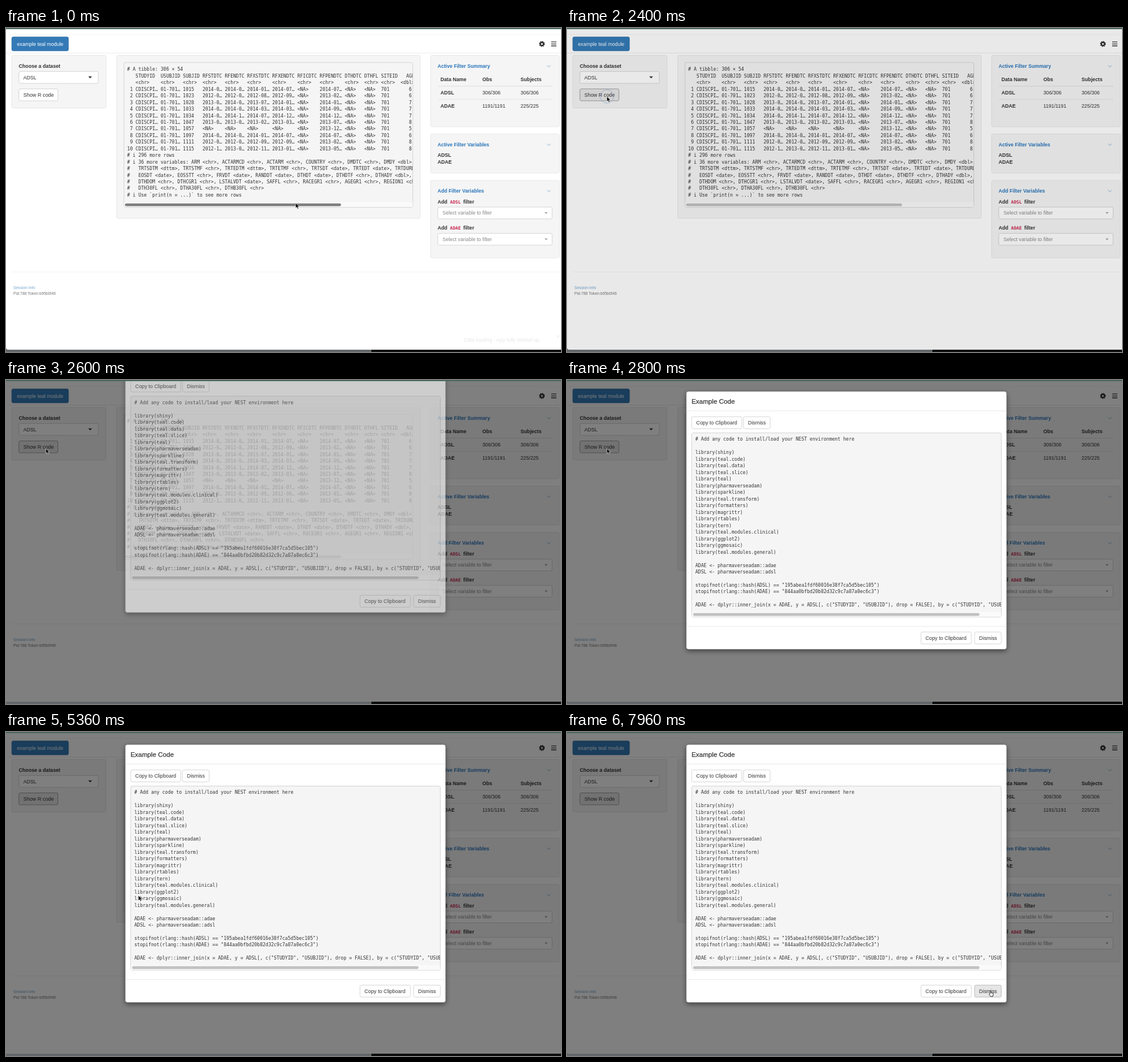
An HTML page that plays this animation: 960 px wide and 561 px high, repeating every 8000 ms.

```html
<!DOCTYPE html>
<html lang="en">
<head>
<meta charset="utf-8">
<title>example teal module</title>
<style>
html, body { margin: 0; width: 100%; height: 100%; overflow: hidden; background: #fff; }
svg { display: block; width: 960px; height: 561px; }
text { font: 8.7px "Liberation Sans", Arial, sans-serif; fill: #333; white-space: pre; }
.b { font-weight: bold; }
.btn { font-size: 8.85px; }
.head { font-weight: bold; font-size: 8.6px; fill: #2a76bb; }
.small { font-size: 6.8px; fill: #777; }
.mono { font: 8.02px "DejaVu Sans Mono", monospace; }
.code { font: bold 7.7px "DejaVu Sans Mono", monospace; fill: #c7254e; }
.title { font-size: 11.4px; stroke: #333; stroke-width: .25; }
</style>
</head>
<body>
<svg id="stage" viewBox="0 0 960 561" xmlns="http://www.w3.org/2000/svg"></svg>
<script>
const LOOP = 8000;
const esc = s => s.replace(/&/g, '&amp;').replace(/</g, '&lt;');
const text = (x, y, s, cls = '', extra = '') =>
  `<text x="${x}" y="${y}" class="${cls}" ${extra}>${esc(s)}</text>`;
const box = (x, y, x2, y2, fill, stroke = 'none', r = 2.5, extra = '') =>
  `<rect x="${x}" y="${y}" width="${x2 - x}" height="${y2 - y}" rx="${r}" fill="${fill}" stroke="${stroke}" stroke-width=".8" ${extra}/>`;
const line = (x, y, x2, color, w = .8) =>
  `<path d="M${x} ${y}H${x2}" stroke="${color}" stroke-width="${w}"/>`;
const well = (x, y, x2, y2) => box(x, y, x2, y2, '#f5f5f5', '#e3e3e3');
const caret = (x, y, w, color) =>
  `<path d="M${x - w} ${y - w / 2}h${2 * w}l${-w} ${w * 1.1}z" fill="${color}"/>`;
const chevron = y =>
  `<path d="M935.8 ${y - 1.4}l3.2 3 3.2-3" fill="none" stroke="#6f9fca" stroke-width=".8"/>`;
const button = (x, y, x2, label, id = '') =>
  box(x, y, x2, y + 20.7, '#fff', '#ccc', 2.5, id && `id="${id}"`) + text(x + 7.8, y + 13.5, label, 'btn');
const lines = (rows, x, y, step) =>
  rows.map((s, i) => s && text(x, y + i * step, s, 'mono', 'xml:space="preserve"')).join('');

// Console table
const WIDTHS = [2, 8, 7, 6, 7, 7, 8, 8, 7, 8, 6, 5, 6];
const row = (cells, age) =>
  cells.map((c, i) => i ? c.padEnd(WIDTHS[i]) : c.padStart(2)).join(' ') + ' ' + age;
const DATA = `1015 14-0 14-0 14-01 14-07 14-07 6
1023 12-0 12-0 12-08 12-09 13-02 6
1028 13-0 14-0 13-07 14-01 14-01 7
1033 14-0 14-0 14-03 14-03 14-09 7
1034 14-0 14-1 14-07 14-12 14-12 7
1047 13-0 13-0 13-02 13-03 13-07 8
1057 - - - - 13-12 5
1097 14-0 14-0 14-01 14-07 14-07 6
1111 12-0 12-0 12-09 12-09 13-02 8
1115 12-1 13-0 12-11 13-01 13-05 8`;
const NA = '<NA>';
const day = d => d === '-' ? NA : `20${d}…`;
const tibble = [
  '# A tibble: 306 × 54',
  row(['', 'STUDYID', 'USUBJID', 'SUBJID', 'RFSTDTC', 'RFENDTC', 'RFXSTDTC', 'RFXENDTC',
    'RFICDTC', 'RFPENDTC', 'DTHDTC', 'DTHFL', 'SITEID'], '  AGE'),
  row(['', ...Array(12).fill('<chr>')], '<dbl>'),
  ...DATA.split('\n').map((s, i) => {
    const [id, a, b, c, d, e, age] = s.split(' ');
    return row([`${i + 1}`, 'CDISCPI…', '01-701…', id, day(a), day(b), day(c), day(d),
      NA, day(e), NA, NA, '701'], '   ' + age);
  }),
  '# i 296 more rows',
  '# i 36 more variables: ARM <chr>, ACTARMCD <chr>, ACTARM <chr>, COUNTRY <chr>, DMDTC <chr>, DMDY <dbl>,',
  '#   TRTSDTM <dttm>, TRTSTMF <chr>, TRTEDTM <dttm>, TRTETMF <chr>, TRTSDT <date>, TRTEDT <date>, TRTDURD',
  '#   EOSDT <date>, EOSSTT <chr>, FRVDT <date>, RANDDT <date>, DTHDT <date>, DTHDTF <chr>, DTHADY <dbl>,',
  '#   DTHDOM <chr>, DTHCGR1 <chr>, LSTALVDT <date>, SAFFL <chr>, RACEGR1 <chr>, AGEGR1 <chr>, REGION1 <chr>',
  '#   DTH30FL <chr>, DTHA30FL <chr>, DTHB30FL <chr>',
  '# i Use `print(n = ...)` to see more rows'
];

const LIBS = 'shiny teal.code teal.data teal.slice teal pharmaverseadam sparkline teal.transform formatters ' +
  'magrittr rtables tern teal.modules.clinical ggplot2 ggmosaic teal.modules.general';
const script = [
  '# Add any code to install/load your NEST environment here', '',
  ...LIBS.split(' ').map(s => `library(${s})`), '',
  'ADAE <- pharmaverseadam::adae',
  'ADSL <- pharmaverseadam::adsl', '',
  'stopifnot(rlang::hash(ADSL) == "195abea1fdf60016e38f7ca5d5bec105")',
  'stopifnot(rlang::hash(ADAE) == "844aa0bfbd20b82d32c9c7a87a0ec6c3")', '',
  'ADAE <- dplyr::inner_join(x = ADAE, y = ADSL[, c("STUDYID", "USUBJID"), drop = FALSE], by = c("STUDYID", "USUBJID"))'
];

const header =
  line(0, 11.5, 960, '#f3f3f3') + line(0, 43.3, 960, '#e7e7e7') +
  box(10, 15.4, 108, 39.6, '#337ab7', '#2e6da4') +
  text(19, 30.7, 'example teal module', '', 'style="fill:#fff"') +
  '<g fill="none" stroke="#333"><circle cx="927" cy="27.6" r="2.8" stroke-width="2.4"/>' +
  '<circle cx="927" cy="27.6" r="4.3" stroke-width="1.6" stroke-dasharray="1.689"/></g>' +
  [24.2, 27.6, 31].map(y => line(943, y, 952, '#333', 1.3)).join('');

const left = well(10, 47.5, 173, 138.5) +
  text(22, 69, 'Choose a dataset', 'b') +
  box(22.3, 75.3, 159.7, 95.9, '#fff', '#ccc') + text(30, 88.7, 'ADSL') + caret(145.5, 85.3, 3.2, '#333') +
  button(22.3, 105.4, 89.8, 'Show R code', 'show');

const middle = well(191.5, 47.5, 716.5, 329.5) +
  box(204, 59.8, 703.7, 310.4, '#f5f5f5', '#ccc') +
  box(204.5, 301.7, 703.3, 310, '#fafafa', 'none', 1) +
  `<g clip-path="url(#tableClip)">${lines(tibble, 209.6, 74.4, 11.447)}</g>` +
  box(205.8, 303.8, 579.5, 308.6, '#7f7f7f', 'none', 2.4, 'id="thumb"');

const summary = (y, cells, cls) =>
  text(751.5, y, cells[0], 'b') + text(824, y, cells[1], cls) + text(890, y, cells[2], cls);
const picker = (y, name) =>
  text(746.5, y + 3, 'Add', 'b') + text(768, y + 3, name, 'code') + text(791, y + 3, 'filter', 'b') +
  box(746.8, y + 9.6, 944.6, y + 30, '#fff', '#ccc') +
  text(755, y + 22.9, 'Select variable to filter', '', 'style="fill:#888"') + caret(934.2, y + 19.7, 2.6, '#999');

const right =
  well(734.5, 47.5, 957, 171) + well(734.5, 183.5, 957, 251) + well(734.5, 264, 957, 398) +
  text(746.5, 68.9, 'Active Filter Summary', 'head') +
  text(746.5, 204.5, 'Active Filter Variables', 'head') +
  text(746.5, 284.7, 'Add Filter Variables', 'head') +
  [66, 201.8, 282].map(chevron).join('') +
  summary(92.3, ['Data Name', 'Obs', 'Subjects'], 'b') + line(747, 100.8, 945, '#ddd', 1.1) +
  summary(115.3, ['ADSL', '306/306', '306/306']) + line(747, 123.7, 945, '#ddd') +
  summary(137.9, ['ADAE', '1191/1191', '225/225']) +
  text(746.5, 223, 'ADSL', 'b') + text(746.5, 235.4, 'ADAE', 'b') +
  picker(300.5, 'ADSL') + picker(346, 'ADAE');

const footer = line(10, 422.4, 957, '#eee') +
  text(12.8, 452.2, 'Session Info', 'small', 'style="fill:#74a3cd"') +
  text(12.8, 462, 'Pid:788 Token:b95b0f46', 'small') +
  `<g id="note">${text(792, 543, 'Data loading - App fully started up.', '', 'style="fill:#e6e6e6"')}
   ${text(952.5, 537, '×', '', 'style="fill:#e6e6e6"')}</g>`;

const modal =
  box(206.3, 21.8, 760.4, 468.3, '#fff', 'rgba(0,0,0,.3)', 4, 'filter="url(#shadow)"') +
  text(215.5, 42.8, 'Example Code', 'title') + line(206.5, 55.5, 760.2, '#e5e5e5') +
  button(215.7, 65.7, 302.3, 'Copy to Clipboard') + button(305.2, 65.7, 351.4, 'Dismiss') +
  box(215.7, 93.6, 751.3, 412.3, '#f5f5f5', '#ccc') +
  box(216.1, 403.8, 750.9, 411.9, '#fafafa', 'none', 1) +
  `<g clip-path="url(#codeClip)">${lines(script, 222, 107.4, 11.48)}</g>` +
  box(218, 405.6, 713.6, 410.4, '#c1c1c1', 'none', 2.4) +
  line(206.5, 428.6, 760.2, '#e5e5e5') +
  button(612.3, 438.3, 699.4, 'Copy to Clipboard') + button(705, 438.3, 751.2, 'Dismiss', 'dismiss');

document.getElementById('stage').innerHTML = `
<defs>
  <clipPath id="tableClip"><rect x="204" y="60" width="499.3" height="250"/></clipPath>
  <clipPath id="codeClip"><rect x="216" y="94" width="535" height="310"/></clipPath>
  <clipPath id="pageClip"><path d="M0 2H960V557H4Q0 557 0 553Z"/></clipPath>
  <filter id="shadow" x="-10%" y="-10%" width="120%" height="120%">
    <feDropShadow dx="0" dy="3" stdDeviation="4" flood-color="#000" flood-opacity=".5"/>
  </filter>
</defs>
<rect width="960" height="561" fill="#64686b"/>
<rect x="632" y="550" width="328" height="11" fill="#0c0c0c"/>
<rect width="960" height="2" fill="#4a675d"/>
<g clip-path="url(#pageClip)">
  <rect width="960" height="561" fill="#fff"/>
  ${header}${left}${middle}${right}${footer}
  <rect id="shade" width="960" height="561" fill="#000"/>
  <g id="modal">${modal}</g>
</g>
<circle id="ring" fill="none" stroke="#7f9fd0" stroke-width="1"/>
<path id="arrow" d="M0 0V8.8L2 7 3.4 10.2 5 9.5 3.6 6.4H6.3Z" fill="#000" stroke="#fff" stroke-width=".6"/>
<path id="hand" d="M-.8 6.2V.9Q0-.3.8.9V4.2Q1.7 3.6 2.2 4.4 3 3.9 3.5 4.7 4.6 4.4 4.6 5.5V7.5L3.9 10.4H.2L-2.3 7Q-2.5 5.6-.8 6.2Z"
  fill="#fff" stroke="#000" stroke-width=".8"/>`;

const el = id => document.getElementById(id);
const [note, thumb, show, shade, panel, dismiss, ring, arrow, hand] =
  ['note', 'thumb', 'show', 'shade', 'modal', 'dismiss', 'ring', 'arrow', 'hand'].map(el);
const ramp = (t, a, b) => Math.min(1, Math.max(0, (t - a) / (b - a)));
const smooth = p => p * p * (3 - 2 * p);

// cubic-bezier(0, 0, .58, 1)
function easeOut(x) {
  let lo = 0, hi = 1;
  for (let i = 0; i < 24; i++) {
    const s = (lo + hi) / 2;
    if (1.74 * (1 - s) * s * s + s * s * s < x) lo = s; else hi = s;
  }
  return 3 * (1 - lo) * lo * lo + lo ** 3;
}

// Each move: start, end, target x, target y
const MOVES = [
  [900, 1680, 69, 118.5], [3460, 4300, 225, 315], [4740, 5040, 225, 294],
  [5320, 5360, 229, 283], [5360, 5480, 239, 274], [5660, 7000, 278, 251], [7140, 7640, 732.5, 447.5]
];
function pointer(t) {
  let x = 501, y = 303;
  for (const [a, b, tx, ty] of MOVES) {
    const p = smooth(ramp(t, a, b));
    x += (tx - x) * p;
    y += (ty - y) * p;
  }
  return [x, y];
}
const inside = (x, y, x1, y1, x2, y2) => x > x1 && x < x2 && y > y1 && y < y2;
function press(node, on, edge = '#adadad') {
  node.setAttribute('fill', on ? '#e6e6e6' : '#fff');
  node.setAttribute('stroke', on ? edge : '#ccc');
}

function draw(t) {
  const [x, y] = pointer(t);
  const open = t >= 2375;
  const onShow = !open && inside(x, y, 22, 105, 90, 126);
  const onDismiss = open && inside(x, y, 705, 438, 751, 459);
  const pointing = onShow || onDismiss;

  note.setAttribute('opacity', 1 - ramp(t, 20, 240));
  thumb.setAttribute('fill', inside(x, y, 204, 302, 704, 311) && !open ? '#7f7f7f' : '#c1c1c1');
  press(show, onShow || open, open ? '#8c8c8c' : '#adadad');
  press(dismiss, onDismiss);
  shade.setAttribute('opacity', .5 * ramp(t, 2375, 2525));
  panel.setAttribute('opacity', ramp(t, 2509, 2659));
  panel.setAttribute('transform', `translate(0 ${-112 * (1 - easeOut(ramp(t, 2512, 2834)))})`);

  // Click ripple
  const grow = ramp(t, 2320, 2540);
  ring.setAttribute('cx', x);
  ring.setAttribute('cy', y);
  ring.setAttribute('r', 5 + 18 * grow);
  ring.setAttribute('opacity', grow > 0 ? 1 - grow : 0);

  arrow.setAttribute('visibility', pointing ? 'hidden' : 'visible');
  hand.setAttribute('visibility', pointing ? 'visible' : 'hidden');
  (pointing ? hand : arrow).setAttribute('transform', `translate(${x} ${y})`);
}

const start = performance.now();
function tick() {
  draw((performance.now() - start) % LOOP);
  requestAnimationFrame(tick);
}
tick();
</script>
</body>
</html>
```
